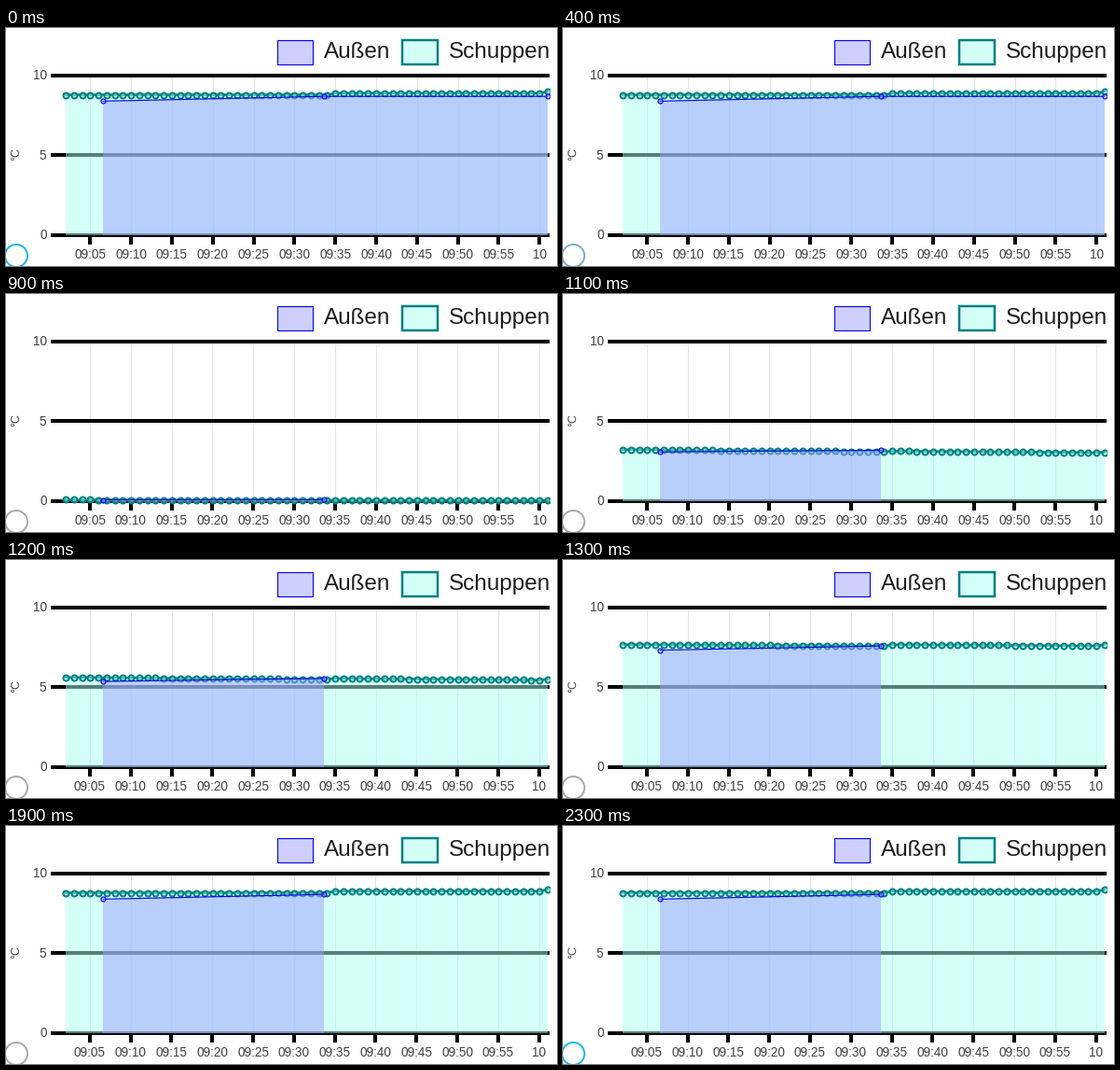
These frames come from a looping animation (591x255 px, 2400 ms). A matplotlib script:

```python
import numpy as np
import matplotlib.pyplot as plt
from matplotlib.animation import FuncAnimation
from matplotlib.patches import Arc, Polygon, Rectangle

W, H, DPI = 591, 255, 100
EPS = 1e-3                         # keeps the pixel size from rounding down
FRAMES, STEP_MS = 24, 100
PT = 72 / DPI                      # points per pixel
LEFT, RIGHT, CLIP = 64, 581, 583
BASE, UNIT = 222, 17.1             # y of 0 degrees, pixels per degree
MINUTE = (RIGHT - LEFT) / 59
RESTART = 9                        # step at which the chart is rebuilt

TEAL, TEAL_FILL = "#008080", (170 / 255, 1, 241 / 255, 0.5)
BLUE, BLUE_FILL = "#0a0ae6", (160 / 255, 160 / 255, 1, 0.5)
INK = "#404040"
ACTIVE, IDLE = np.array([34, 184, 222]) / 255, np.array([170, 170, 170]) / 255

plt.rcParams["font.family"] = "Liberation Sans"
fig = plt.figure(figsize=((W + EPS) / DPI, (H + EPS) / DPI), dpi=DPI,
                 facecolor="white")
ax = fig.add_axes([0, 0, 1, 1])
ax.set_xlim(0, W)
ax.set_ylim(H, 0)
ax.axis("off")
clip = Rectangle((0, 0), CLIP, H, transform=ax.transData)


def label(x, y, text, px, color=INK, **kw):
    return ax.text(x, y, text, fontsize=px * PT, color=color, **kw)


def stroke(xs, ys, color, px, z):
    return ax.plot(xs, ys, color=color, lw=px * PT, zorder=z,
                   solid_capstyle="butt", snap=True)[0]


def legend_item(x, text, text_x, edge, fill, px):
    ax.add_patch(Rectangle((x, 13), 38, 26, fc=fill, ec=edge, lw=px * PT))
    label(text_x, 32, text, 24.3, "#1c1c1c")


class Series:
    """Filled line with round markers, raised from the base line."""

    def __init__(self, edge, fill, line_px, dot_px, dot_edge, z):
        self.area = ax.add_patch(Polygon([(0, 0), (0, 1), (1, 1)], fc=fill,
                                         ec="none", lw=0, zorder=z))
        self.line, = ax.plot([], [], color=edge, lw=line_px * PT, zorder=z + 1)
        self.dots, = ax.plot([], [], "o", ms=dot_px * PT, mfc=fill, mec=edge,
                             mew=dot_edge * PT, zorder=z + 2)
        for part in (self.area, self.line, self.dots):
            part.set_clip_path(clip)

    def draw(self, xs, values, grow):
        ys = BASE - UNIT * values * grow
        self.area.set_xy(np.vstack([(xs[0], BASE), np.column_stack([xs, ys]),
                                    (xs[-1], BASE)]))
        self.line.set_data(xs, ys)
        self.dots.set_data(xs, ys)


legend_item(290.5, "Außen", 340.5, BLUE, BLUE_FILL, 1.2)
legend_item(424.7, "Schuppen", 474.5, TEAL, TEAL_FILL, 2.5)
label(11, 135, "°C", 12.5, rotation=90, ha="center", va="center")
for value in (0, 5, 10):
    y = BASE - UNIT * value
    stroke([48, CLIP], [y, y], "black", 4, 2)
    label(43.5, y + 4, str(value), 13.6, ha="right")

ticks = []
for minute in range(5, 61, 5):
    x = LEFT + (minute - 2) * MINUTE
    text = f"09:{minute:02d}" if minute < 60 else "10"
    grid = stroke([x, x], [53, BASE], "#e5e5e5", 1, 1)
    mark = stroke([x, x], [BASE, 232], "black", 4, 2)
    ticks.append((x, grid, mark, label(x, 247, text, 13.6, ha="center")))

corner = ax.add_patch(Arc((11, 244), 24, 24, lw=2 * PT))

shed = Series(TEAL, TEAL_FILL, 2.5, 6, 2, 3)
outside = Series(BLUE, BLUE_FILL, 1.2, 5, 1.2, 6)
shed_x = LEFT + MINUTE * np.arange(60)
shed_v = np.where(np.arange(60) < 33, 8.8, 8.9)
shed_v[-1] = 9.0
out_x = np.array([104, 341, RIGHT])
out_v = np.array([8.4, 8.7, 8.7])
lag = np.linspace(0, 0.1, 60)


def rise(steps):
    t = np.clip(steps / 5.75, 0, 1)
    return np.minimum(1, 1.01 * (1 - np.cos(np.pi * t)) / 2)


def update(k):
    rebuilt = k >= RESTART
    since = k - RESTART + 0.37 if rebuilt else 99
    n = 2 if rebuilt else 3
    shed.draw(shed_x, shed_v, rise(since - lag))
    outside.draw(out_x[:n], out_v[:n], rise(since))

    # the time axis creeps left while the clock runs
    drift = -0.6 * k / (FRAMES - 1)
    for x, grid, mark, text in ticks:
        grid.set_xdata([x + drift] * 2)
        mark.set_xdata([x + drift] * 2)
        text.set_x(x + drift)

    idle = np.interp(k, [2, 5, 19, 22], [0, 1, 1, 0])
    corner.set_edgecolor(ACTIVE + (IDLE - ACTIVE) * idle)
    return []


anim = FuncAnimation(fig, update, frames=FRAMES, interval=STEP_MS,
                     init_func=lambda: update(0), repeat=True, repeat_delay=0)
plt.show()
```
